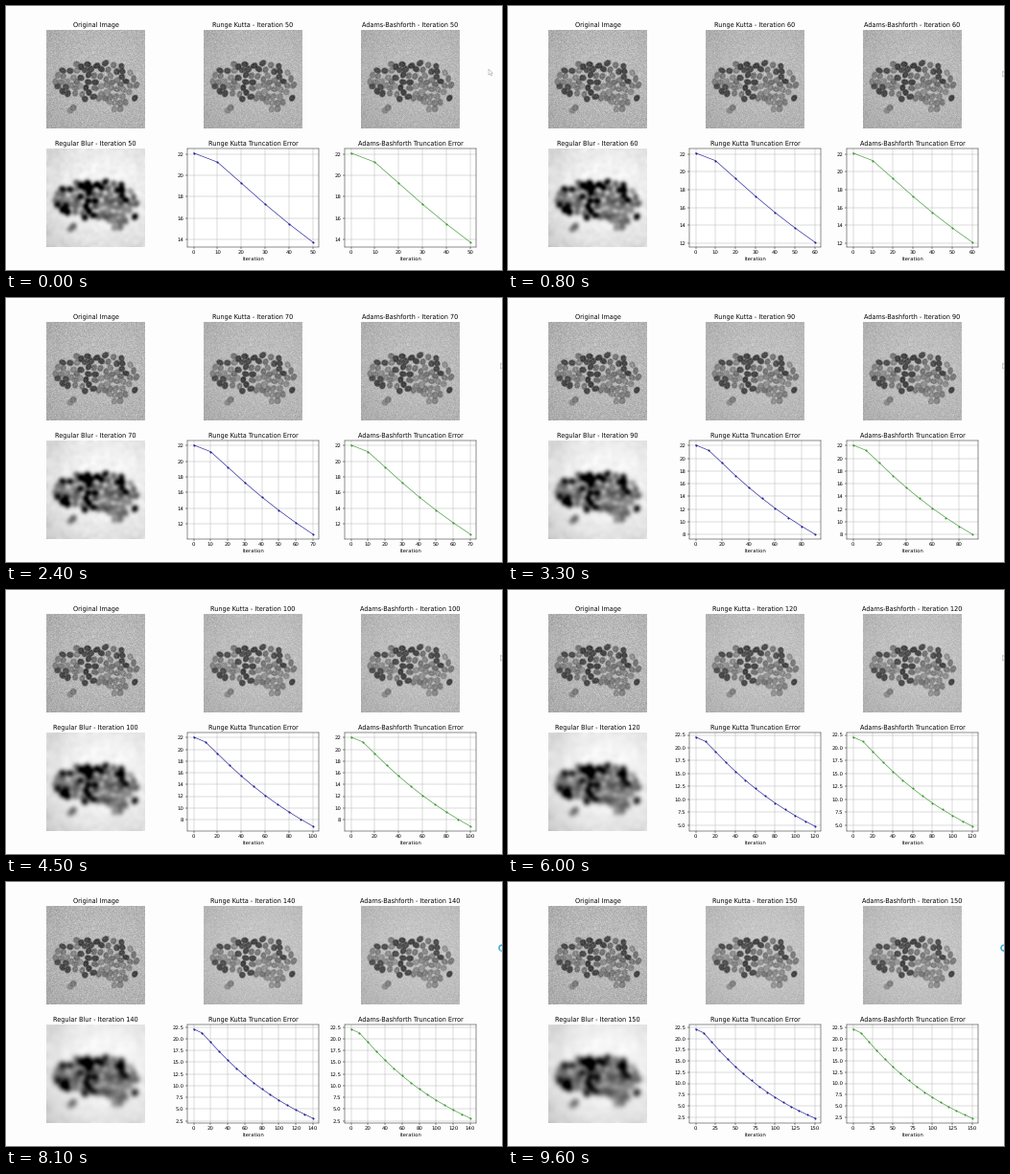
Recreate the animation shown at these times as a matplotlib script. Size 517x276 px, loop 9.7 s.

```python
import numpy as np
import matplotlib.pyplot as plt
from matplotlib.animation import FuncAnimation
from matplotlib.patches import Arc, Circle, Polygon

W, H, DPI = 517, 276, 40
FRAMES, INTERVAL = 97, 100
SIZE = 103
TITLE, LABEL = 11.7, 9.75
BUSY_FROM = 79

# frame at which each further 10 iterations appear
STEPS = [7, 17, 25, 33, 41, 50, 60, 69, 79, 89]

# centres of the dark clumps inside the cell cluster
CLUMPS = np.array([(17, 64), (43, 40), (44, 54), (46, 68), (57, 37), (76, 44)])

plt.rcParams["text.hinting"] = "no_hinting"
rng = np.random.default_rng(11)


def error(n):
    """Truncation error: a decay with a soft start."""
    k = n / 10
    return -7.5 + 24.8 * np.exp((3 - k) / 12.85) - 1.72 * np.exp(-2 * k)


def in_cluster(x, y):
    body = ((x - 52) / 43) ** 2 + ((y - 53) / 20) ** 2 < 1
    tail = ((x - 74) / 9) ** 2 + ((y - 74) / 12) ** 2 < 1
    return body or tail


def scatter_cells(spacing=5.3, tries=3000):
    """Pack cells at random; those near a clump are dark."""
    cells = [(92, 71, 52), (28, 81, 112), (25, 84, 125)]
    for x, y in rng.uniform((9, 33), (96, 86), (tries, 2)):
        if not in_cluster(x, y):
            continue
        if min(np.hypot(x - cx, y - cy) for cx, cy, _ in cells) < spacing:
            continue
        near = np.hypot(*(CLUMPS - (x, y)).T).min()
        dark = near < 7.5 or rng.random() < 0.15
        tone = rng.uniform(48, 72) if dark else rng.uniform(98, 135)
        cells.append((x, y, tone))
    return sorted(cells, key=lambda cell: -cell[2])


def paint_cell(img, x, y, tone):
    """Blend one soft oval cell into a double-size image."""
    gy, gx = np.mgrid[:2 * SIZE, :2 * SIZE] / 2
    angle = rng.uniform(0, np.pi)
    c, s = np.cos(angle), np.sin(angle)
    u = ((gx - x) * c + (gy - y) * s) / rng.uniform(3.3, 3.9)
    v = ((gy - y) * c - (gx - x) * s) / rng.uniform(2.8, 3.3)
    d = np.hypot(u, v)
    alpha = 0.95 * np.clip((1.2 - d) / 0.4, 0, 1)
    body = tone + 16 * np.exp(-(d / 0.5) ** 2)
    img += alpha * (body - img)


def make_cells():
    y, x = np.mgrid[:2 * SIZE, :2 * SIZE] / SIZE - 1
    img = 187 - 8 * (x ** 2 + y ** 2) + 3 * x - 2 * y
    for cell in scatter_cells():
        paint_cell(img, *cell)
    return img.reshape(SIZE, 2, SIZE, 2).mean(axis=(1, 3))


def blur(img, sigma):
    r = int(4 * sigma) + 1
    k = np.exp(-0.5 * (np.arange(-r, r + 1) / sigma) ** 2)
    k /= k.sum()
    out = np.pad(img, r, mode="edge")
    for axis in (0, 1):
        out = np.apply_along_axis(np.convolve, axis, out, k, "valid")
    return out


def stretch(img):
    low = np.percentile(img, 0.7)
    return 250 * (img - low) / (img.max() - low)


cells = make_cells()
grain = rng.normal(0, 8, (SIZE, SIZE))


def solved(n):
    t = (n - 50) / 100
    return (cells + (0.9 - 0.3 * t) * grain) * (1 + 0.06 * t)


blurred = {n: stretch(blur(cells + grain, 1.8 + 0.01 * (n - 50)))
           for n in range(50, 151, 10)}

fig = plt.figure(figsize=(W / DPI, H / DPI), dpi=DPI, facecolor="#fdfdfd")


def add_axes(x, y, w, h):
    return fig.add_axes([x / W, 1 - (y + h) / H, w / W, h / H])


def add_image(x, y, data, title):
    ax = add_axes(x, y, SIZE, SIZE)
    pic = ax.imshow(data, cmap="gray", vmin=0, vmax=255,
                    interpolation="nearest", aspect="auto")
    ax.axis("off")
    return pic, ax.set_title(title, fontsize=TITLE)


def add_plot(x, color, title):
    ax = add_axes(x, 149, 136.8, 102.6)
    line, = ax.plot([], [], color=color, marker=".", lw=1.15, ms=5)
    ax.set_title(title, fontsize=TITLE)
    ax.set_xlabel("Iteration", fontsize=LABEL)
    ax.tick_params(labelsize=LABEL)
    ax.grid(True)
    return ax, line


add_image(42, 25, cells + grain, "Original Image")
rk_pic, rk_title = add_image(206, 25, solved(50), "")
ab_pic, ab_title = add_image(370, 25, solved(50), "")
blur_pic, blur_title = add_image(42, 149, blurred[50], "")
plots = [add_plot(189.3, "#20209a", "Runge Kutta Truncation Error"),
         add_plot(353.3, "#3f9a35", "Adams-Bashforth Truncation Error")]

# pointer at the right edge, in pixel coordinates
over = add_axes(0, 0, W, H)
over.set(xlim=(0, W), ylim=(H, 0))
over.axis("off")
ARROW = np.array([(0, 0), (0, 6), (1.5, 4.7), (2.6, 7), (3.5, 6.6),
                  (2.6, 4.4), (4.4, 4.3)])
arrow = over.add_patch(Polygon(ARROW, fc="white", ec="#a8a8a8", lw=1))
ring = over.add_patch(Circle((517, 69), 3, fill=False, ec="#35aed6", lw=2.8))
glint = over.add_patch(Arc((517, 69), 6, 6, theta1=0, theta2=60,
                           ec="#8fd6ec", lw=2.8))


def show_iteration(n):
    rk_title.set_text(f"Runge Kutta - Iteration {n}")
    ab_title.set_text(f"Adams-Bashforth - Iteration {n}")
    blur_title.set_text(f"Regular Blur - Iteration {n}")
    rk_pic.set_data(solved(n))
    ab_pic.set_data(solved(n))
    blur_pic.set_data(blurred[n])
    x = np.arange(0, n + 1, 10)
    y = error(x)
    mx, my = 0.05 * n, 0.05 * (y[0] - y[-1])
    for ax, line in plots:
        line.set_data(x, y)
        ax.set_xlim(-mx, n + mx)
        ax.set_ylim(y[-1] - my, y[0] + my)


def update(i):
    show_iteration(50 + 10 * sum(i >= s for s in STEPS))
    busy = i >= BUSY_FROM
    slide = min(i / 3, 1)
    arrow.set_xy(ARROW + (503 + 12.5 * slide, 66 + 2 * slide))
    arrow.set_visible(not busy)
    ring.set_visible(busy)
    glint.set_visible(busy)
    glint.theta1 = 36 * (i - BUSY_FROM)
    glint.theta2 = glint.theta1 + 60
    return []


anim = FuncAnimation(fig, update, frames=FRAMES, interval=INTERVAL,
                     init_func=lambda: update(0), repeat=True, repeat_delay=0)
plt.show()
```
